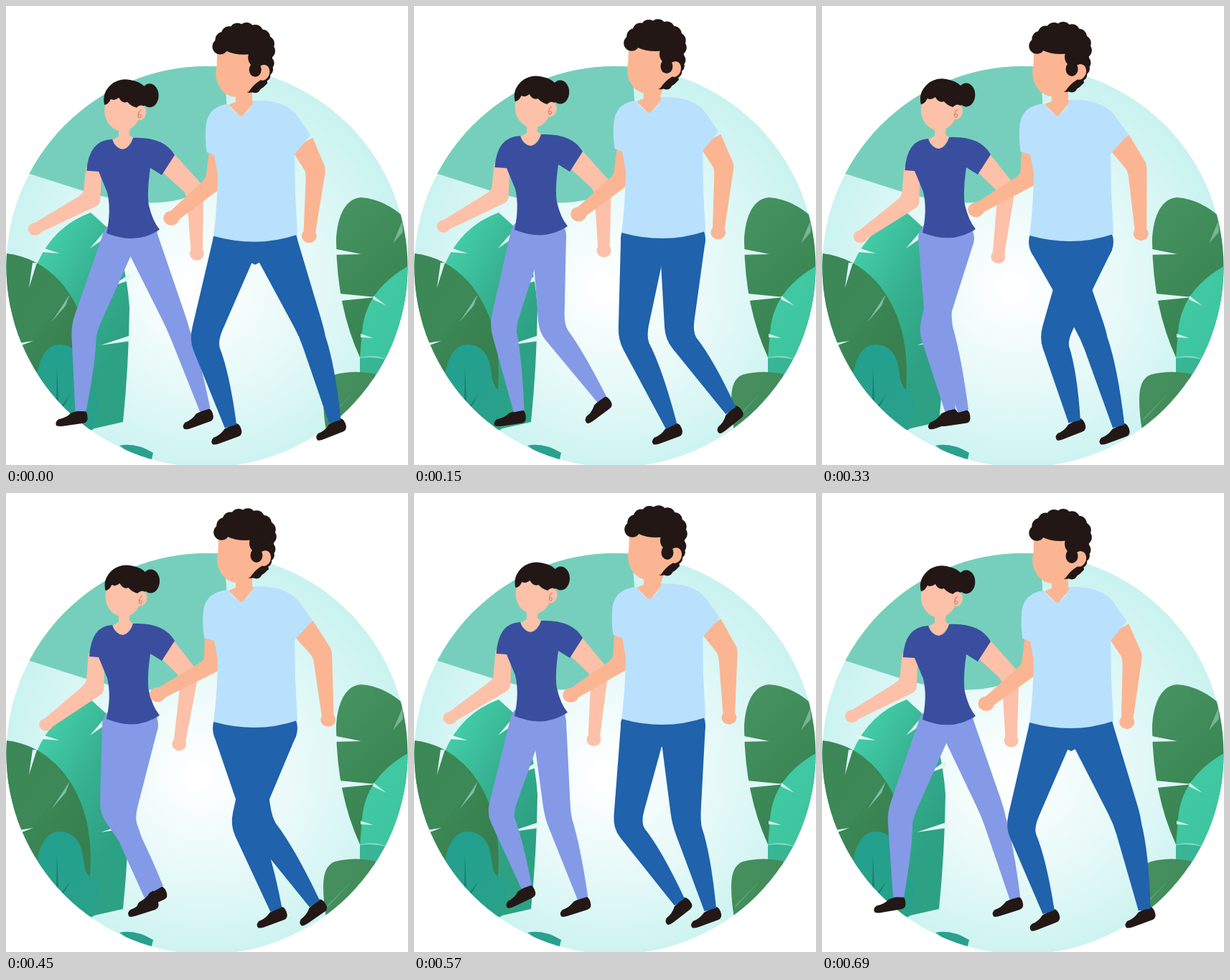
These frames come from a looping animation (560 by 640 pixels, 0.72 s). An HTML page with a canvas:

```html
<!DOCTYPE html>
<html lang="en">
<head>
<meta charset="utf-8">
<title>Walking couple</title>
<style>
  html, body { margin: 0; width: 100%; height: 100%; overflow: hidden; background: #fff; }
  canvas { display: block; }
</style>
</head>
<body>
<canvas id="stage" width="560" height="640"></canvas>
<script>
const ctx = document.getElementById('stage').getContext('2d');
const LOOP = 720, STEP = 30, TAU = Math.PI * 2;
const HAIR = '#221715', SHOE = '#231815';

const mix = (a, b, k) => a.map((v, i) => v + (b[i] - v) * k);
const unit = (a, b) => {
  const d = Math.hypot(b[0] - a[0], b[1] - a[1]);
  return [(b[0] - a[0]) / d, (b[1] - a[1]) / d];
};
const side = (p, d, w) => [p[0] - d[1] * w, p[1] + d[0] * w];
const clamp = v => Math.max(0, Math.min(1, v));

function shape(fill, d) {
  ctx.fillStyle = fill;
  ctx.fill(new Path2D(d));
}

function oval(fill, x, y, rx, ry = rx, turn = 0) {
  ctx.fillStyle = fill;
  ctx.beginPath();
  ctx.ellipse(x, y, rx, ry, turn, 0, TAU);
  ctx.fill();
}

function blend(x0, y0, x1, y1, ...colors) {
  const g = ctx.createLinearGradient(x0, y0, x1, y1);
  colors.forEach((c, i) => g.addColorStop(i / (colors.length - 1), c));
  return g;
}

function shifted(dx, dy, draw) {
  ctx.save();
  ctx.translate(dx, dy);
  draw();
  ctx.restore();
}

// Tapered two-part limb with a soft joint
function limb(fill, a, b, c, [wa, wb, wc], calf = 0) {
  const d1 = unit(a, b), d2 = unit(b, c);
  const mid = unit([0, 0], [d1[0] + d2[0], d1[1] + d2[1]]);
  const edge = s => [side(a, d1, s * wa), side(b, mid, s * wb), side(c, d2, s * wc)];
  const [a1, b1, c1] = edge(1), [a2, b2, c2] = edge(-1);
  const bulge = side(mix(b2, c2, 0.4), d2, -calf);
  ctx.fillStyle = fill;
  ctx.beginPath();
  ctx.moveTo(...a1);
  ctx.lineTo(...mix(b1, a1, 0.12));
  ctx.quadraticCurveTo(...b1, ...mix(b1, c1, 0.12));
  ctx.lineTo(...c1);
  ctx.lineTo(...c2);
  ctx.quadraticCurveTo(...bulge, ...mix(b2, c2, 0.08));
  ctx.quadraticCurveTo(...b2, ...mix(b2, a2, 0.12));
  ctx.lineTo(...a2);
  ctx.fill();
}

function arm(fill, shoulder, elbow, hand, widths, fist) {
  limb(fill, shoulder, elbow, hand, widths);
  oval(fill, ...hand, fist, fist * 0.93);
}

// The planted foot slides back evenly, then lifts and eases forward.
function gait(phase, { ankle, stride, knee, reach }) {
  const stance = 405;
  const slide = phase < stance ? phase / stance
    : 0.5 + 0.5 * Math.cos(Math.PI * (phase - stance) / (LOOP - stance));
  const lift = Math.sin(Math.PI * clamp((phase - 350) / 350));
  const turn = TAU * (phase - 350) / LOOP;
  const sway = Math.cos(turn) + 0.14 * Math.cos(2 * turn);
  return {
    lift,
    ankle: [ankle[0] + stride * slide, ankle[1] - 17 * lift],
    knee: [knee[0] + reach * sway, knee[1] - 4 * Math.cos(turn)],
  };
}

function leg(fill, spec, t, bob, lag = 0) {
  const { lift, knee, ankle } = gait((t + lag) % LOOP, spec);
  const hip = [spec.hip[0], spec.hip[1] + bob];
  const [wa, wb, wc] = spec.widths;
  const thigh = unit(hip, knee), shin = unit(knee, ankle);
  const bend = Math.abs(thigh[0] * shin[1] - thigh[1] * shin[0]);
  ctx.save();
  ctx.translate(...ankle);
  ctx.rotate((spec.tilt - 19 * lift) * Math.PI / 180);
  ctx.translate(spec.heel, 0.5);
  ctx.scale(1.04, 1.04);
  shape(SHOE, 'M-9 0Q-17 6-27 6Q-33 9-31 14Q-29 16-22 16L5 16Q12 16 12 7Q12 0 8-2Z');
  ctx.restore();
  oval(fill, ...hip, wa);
  limb(fill, hip, knee, ankle, [wa, wb * (0.7 + 0.3 * clamp(bend / 0.2)), wc], spec.calf);
}

const WOMAN = { stride: 114, heel: -4, calf: 4, widths: [24, 18.5, 7.5] };
const WOMAN_LEAD = { ...WOMAN, hip: [158, 325], knee: [132, 445], ankle: [104, 565], reach: 27, tilt: -8 };
const WOMAN_TRAIL = { ...WOMAN, hip: [188, 325], knee: [190, 450], ankle: [176, 565], reach: 43, tilt: -18 };
const MAN = { stride: 123, heel: 0, calf: 6, widths: [32, 20, 8.5], reach: 52, tilt: -20 };
const MAN_LEAD = { ...MAN, hip: [320, 330], knee: [320, 462], ankle: [313, 586] };
const MAN_TRAIL = { ...MAN, hip: [374, 330], knee: [367, 460], ankle: [349, 581] };

function scenery() {
  ctx.fillStyle = '#fff';
  ctx.fillRect(0, 0, 560, 640);
  ctx.save();
  ctx.beginPath();
  ctx.arc(280, 363.5, 279.5, 0, TAU);
  ctx.clip();
  const sky = ctx.createRadialGradient(265, 395, 10, 280, 375, 300);
  sky.addColorStop(0, '#ffffff');
  sky.addColorStop(0.5, '#e5f9f8');
  sky.addColorStop(1, '#c6f2ef');
  ctx.fillStyle = sky;
  ctx.fillRect(0, 80, 560, 560);
  shape('#76cfbc', 'M0 70H302L307 130Q312 225 275 255C235 283 170 278 105 257L30 233L0 240Z');

  // Left leaves
  const gap = '#e0f7f5';
  shape(blend(45, 360, 175, 440, '#42cba5', '#36b090', '#2da183'),
    'M118 288Q66 307 43 360L60 560L110 592L163 580Q171 500 172 420Q166 340 140 308Z');
  shape(gap, 'M47 336L75 345L50 343ZM140 311L117 338L140 322ZM173 373L147 391L173 382ZM174 459L132 473L174 467Z');
  shape(blend(0, 380, 115, 450, '#418f5d', '#37804f'),
    'M0 345Q45 350 76 385Q124 440 117 535L90 560L0 520Z');
  shape(blend(0, 360, 90, 430, '#3b8756', '#3d8958'), 'M0 345Q50 350 89 404Q55 440 37 468L0 470Z');
  shape('#7fc0a3', 'M89 402L63 441L83 418Z');
  shape(gap, 'M43 358L32 393L37 358ZM18 470L38 467L22 473Z');
  shape(blend(60, 475, 110, 590, '#22a08f', '#29a18a'),
    'M40 540Q44 472 75 472Q104 473 108 512Q110 536 124 538Q134 550 122 590L100 600L50 570Z');
  shape('#178074', 'M71 503L73 550L70 550ZM53 530L72 550L70 552ZM91 540L79 560L77 558Z');
  shape('#2aa18f', 'M158 613Q180 608 205 623L203 632L185 632Z');

  // Right leaves
  shape(blend(460, 300, 560, 400, '#459160', '#388452'),
    'M495 267C470 268 460 300 460 330Q461 420 493 490L495 520L570 520V310Q535 270 495 267Z');
  shape('#78b595', 'M552 300L539 331L553 315Z');
  shape(gap, 'M455 338L495 346L455 347ZM464 401L516 406L466 411Z');
  shape('#38b594', 'M493 488L540 485L540 530L493 515Z');
  shape(blend(495, 400, 560, 450, '#40caa4', '#3ec59f'),
    'M565 360Q500 395 496 455L493 490Q515 485 535 495L570 470Z');
  shape('#c9f0e8', 'M512 404L530 418L511 409ZM494 457L512 463L494 462Z');
  shape('#8fdcc6', 'M493 490Q515 485 534 494Q512 488 493 491Z');
  shape(blend(442, 520, 500, 570, '#478f5f', '#418b59'),
    'M442 548Q442 520 458 514Q485 507 514 513L520 560L446 592Q442 570 442 548Z');
  shape('#5aa077', 'M482 541L448 578L447 575Z');
  ctx.restore();
}

function woman(t, bob, swing) {
  const skin = '#fcc1a8', pants = '#849ae6', shirt = '#3a4e9f';
  const at = (a, b) => { const p = mix(a, b, swing); return [p[0], p[1] + bob]; };
  arm(skin, at([224, 217], [222, 217]), at([264, 257], [256, 256]), at([268, 345], [241, 352]), [15, 13, 8], 10);
  leg(pants, WOMAN_TRAIL, t, bob, LOOP / 2);
  leg(pants, WOMAN_LEAD, t, bob);
  arm(skin, at([122, 226], [126, 226]), at([119, 269], [124, 274]), at([39, 310], [56, 325]), [11, 14, 7.5], 9.5);
  shifted(0, bob, () => {
    shape(pants, 'M139 312H212L204 330L174 344L142 330Z');
    shape(skin, 'M157 165H173L172 180L178 185L163 204L147 188L157 182Z');
    const cuff = 112 + 4 * swing;
    shape(shirt, `M148 186Q152 199 163 200Q173 198 177 184Q220 182 235 208L217 236L201 226
      Q196 262 199 278Q204 300 214 312Q182 334 140 317Q147 285 141 260L129 231L${cuff} 230
      Q${cuff + 3} 187 148 186Z`);
  });
  shifted(-0.75 * bob, bob, () => {
    oval(skin, 162, 146, 25, 28.5);
    oval(HAIR, 200, 125, 12.5, 16.5);
    shape(HAIR, `M137 138Q133 122 146 110Q160 98 180 105Q198 110 198 130L194 139L182 142
      Q174 140 169 134Q162 137 157 128Q151 133 146 130Q142 138 137 138Z`);
    oval(skin, 187, 149, 8, 10.5, 0.25);
    ctx.strokeStyle = '#d68a70';
    ctx.lineWidth = 1.3;
    ctx.stroke(new Path2D('M188 145Q183 149 184 155Q187 158 188 153Q186 150 184 153'));
  });
}

function curlyHair() {
  oval(HAIR, 331, 51, 34, 17);
  oval(HAIR, 352, 72, 15, 15);
  const curls = 10;
  for (let i = 0; i < curls; i++) {
    const a = Math.PI * (1.04 + 1.12 * i / (curls - 1));
    oval(HAIR, 331 + 33 * Math.cos(a), 60 + 26 * Math.sin(a), 11);
  }
  for (let k = 0; k <= 1; k += 0.25) {
    oval(HAIR, 364 - 17 * k * k, 80 + 34 * k, 9.5 - 2 * k);
  }
}

function man(t, bob, swing) {
  const skin = '#fbb592', pants = '#2062ab', shirt = '#b9e1fd';
  const at = (a, b) => { const p = mix(a, b, swing); return [p[0], p[1] + bob]; };
  leg(pants, MAN_TRAIL, t, bob, LOOP / 2);
  leg(pants, MAN_LEAD, t, bob);
  arm(skin, at([412, 192], [414, 190]), at([431, 230], [441, 226]), at([420, 321], [449, 318]), [17, 14, 8], 10.5);
  arm(skin, at([295, 200], [288, 196]), at([290, 247], [287, 242]), at([232, 297], [211, 283]), [11, 13, 8], 11);
  shifted(0, bob, () => {
    shape(pants, 'M291 312H405L398 335L347 361L296 335Z');
    shape(skin, 'M320 116H343V132L346 134L328 156L310 138L320 134Z');
    const l = -4 * swing, r = 3 * swing;
    shape(shirt, `M309 137Q319 151 328 154Q341 147 345 132Q394 130 ${410 + r} 160L${424 + r} 180
      L402 207L403 260L406 319Q350 338 289 321Q294 285 295 235L290 208L${280 + l} 204
      Q${277 + l} 185 ${279 + l} 165Q${283 + l} 140 309 137Z`);
  });
  shifted(-bob, bob, () => {
    oval(skin, 320, 94, 28, 33);
    shape(skin, 'M294 62H350V108L341 122L338 132H321V124Q296 122 293 98Z');
    curlyHair();
    shape(HAIR, 'M336 121L344 106L362 96L364 108Q352 122 336 121Z');
    shape(skin, 'M338 92H362L354 104Q345 109 337 121Z');
    oval(skin, 358, 93, 9, 11, 0.3);
    oval(HAIR, 347, 89, 8.5, 10);
  });
}

function frame(now) {
  const t = Math.floor((now % LOOP) / STEP) * STEP;
  const bob = 3 * Math.cos(TAU * (t - 20) / 360) - 3;
  const swing = 0.5 - 0.5 * Math.cos(TAU * (t - 65) / LOOP);
  scenery();
  woman(t, bob, swing);
  man(t, bob, swing);
  requestAnimationFrame(frame);
}
frame(performance.now());
</script>
</body>
</html>
```
